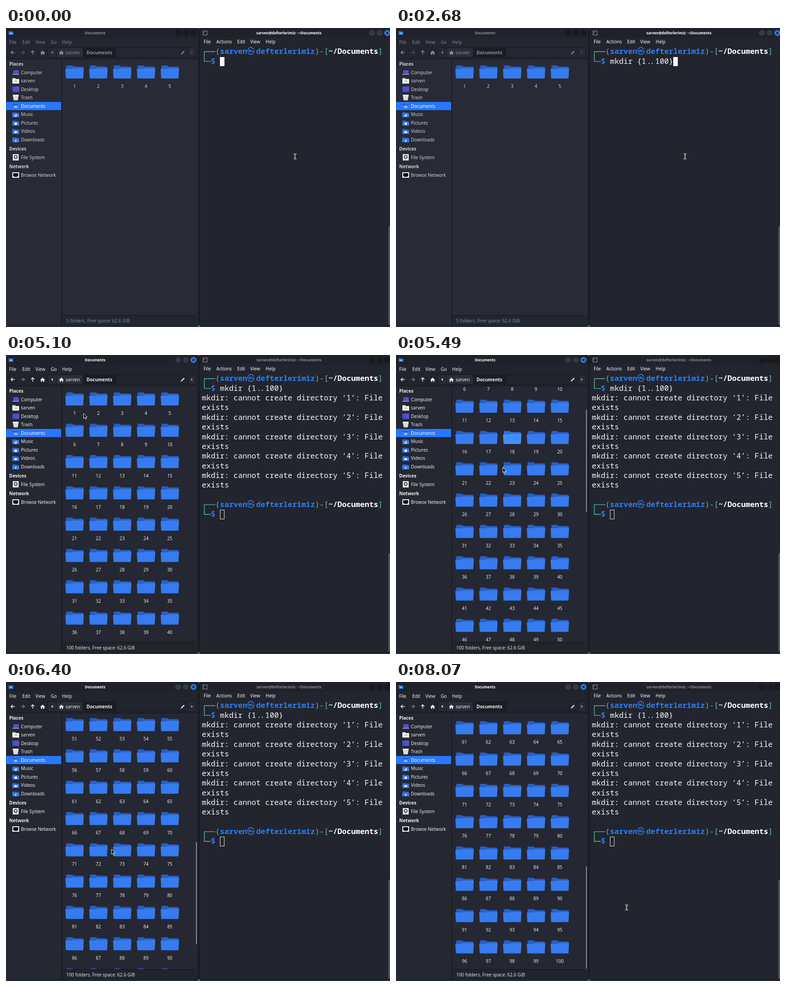
Recreate the animation shown at these times as an HTML page with a canvas. Size 849 by 659 pixels, loop 8.14 s.

```html
<!DOCTYPE html>
<html lang="en">
<head>
<meta charset="utf-8">
<title>mkdir with a brace range</title>
<style>
html, body { margin: 0; width: 100%; height: 100%; overflow: hidden; background: #23252e; }
canvas { display: block; width: 849px; height: 659px; }
</style>
</head>
<body>
<canvas id="stage"></canvas>
<script>
const W = 849, H = 659, LOOP = 8140;
const canvas = document.getElementById('stage');
const ctx = canvas.getContext('2d');
const dpr = window.devicePixelRatio || 1;
canvas.width = W * dpr;
canvas.height = H * dpr;

const UI = '"Noto Sans", "Open Sans", sans-serif';
const MONO = '"Noto Sans Mono", "DejaVu Sans Mono", monospace';
const CJK = '"Noto Sans CJK KR", "Noto Sans CJK JP", "Noto Sans CJK SC", sans-serif';
const USER = 'sarven', HOST = 'defterlerimiz';
const BLUE = '#367bf0', DARK_BLUE = '#2a5fc0', TEAL = '#5ebdab', WHITE = '#ffffff';
const COMMAND = 'mkdir {1..100}';
const KEY_TIMES = [390, 480, 570, 660, 800, 890, 970, 1060, 1660, 1810, 2010, 2460, 2610, 2680];
const ENTER = 3430, CREATED = 3490, MOVE = 4210, STEP = 68.1;
const FOCUS_STEP = 12, MAX_SCROLL = 824, NOTCH = 40.75;

// [step, x, y]
const POINTER = [
  [0, 480, 298], [2, 400, 320], [5, 290, 300], [8, 185, 190], [11, 150, 98],
  [12, 152, 104], [17, 250, 228], [19, 236, 248], [22, 250, 310], [27, 262, 383],
  [30, 240, 378], [34, 226, 359], [36, 205, 432], [39, 178, 500], [43, 260, 560],
  [49, 400, 526], [50, 398, 525], [54, 398, 525], [56, 510, 497]
];
// [step, wheel notches]
const WHEEL = [[15, 0], [19, 3], [27, 10], [34, 20.5]];

function track(keys, n) {
  if (n <= keys[0][0]) return keys[0].slice(1);
  for (let i = 1; i < keys.length; i++) {
    const a = keys[i - 1], b = keys[i];
    if (n <= b[0]) {
      const k = (n - a[0]) / (b[0] - a[0]);
      return a.slice(1).map((v, j) => v + (b[j + 1] - v) * k);
    }
  }
  return keys[keys.length - 1].slice(1);
}

function rect(x, y, w, h, color) {
  ctx.fillStyle = color;
  ctx.fillRect(x, y, w, h);
}

function poly(points, color) {
  ctx.beginPath();
  for (let i = 0; i < points.length; i += 2) ctx.lineTo(points[i], points[i + 1]);
  ctx.closePath();
  ctx.fillStyle = color;
  ctx.fill();
}

function line(points, color, width = 1) {
  ctx.beginPath();
  for (let i = 0; i < points.length; i += 2) ctx.lineTo(points[i], points[i + 1]);
  ctx.strokeStyle = color;
  ctx.lineWidth = width;
  ctx.stroke();
}

function disc(x, y, r, color) {
  ctx.beginPath();
  ctx.arc(x, y, r, 0, Math.PI * 2);
  ctx.fillStyle = color;
  ctx.fill();
}

function label(text, x, y, color, { size = 10, weight = 400, align = 'left' } = {}) {
  ctx.font = `${weight} ${size}px ${UI}`;
  ctx.textAlign = align;
  ctx.fillStyle = color;
  ctx.fillText(text, x, Math.round(y + size * 0.36));
}

function folder(x, y, hot) {
  poly([x + 2, y + 1.5, x + 3, y + 0.5, x + 15, y + 0.5, x + 18.5, y + 3, x + 39, y + 3, x + 40, y + 4, x + 40, y + 12, x + 2, y + 12],
    hot ? '#2f6fdc' : DARK_BLUE);
  poly([x + 0.3, y + 8, x + 14, y + 8, x + 17, y + 6.5, x + 40.5, y + 6.5, x + 41, y + 7.5, x + 39.8, y + 28.3, x + 38.8, y + 29.3, x + 2.4, y + 29.3, x + 1.4, y + 28.3],
    hot ? '#418fff' : BLUE);
}

function miniFolder(x, y, mark) {
  rect(x, y - 5, 7, 4, DARK_BLUE);
  rect(x, y - 4, 14, 9, DARK_BLUE);
  rect(x, y - 2, 15, 8, BLUE);
  if (mark) mark(x + 7.5, y + 2);
}

function titleButtons(xs, focused) {
  xs.forEach((x, i) => {
    const close = i === 2 && focused;
    disc(x, 11, 6.5, close ? '#2f7cf6' : focused ? '#363942' : '#0f1116');
    if (!focused) disc(x, 11, 5.7, '#191b21');
    if (close) {
      line([x - 2.7, 8.3, x + 2.7, 13.7], '#10141c', 1.6);
      line([x + 2.7, 8.3, x - 2.7, 13.7], '#10141c', 1.6);
    }
  });
}

function house(x, y, color) {
  poly([x - 5.5, y + 0.5, x, y - 4.5, x + 5.5, y + 0.5, x + 3.7, y + 0.5, x + 3.7, y + 4.5, x + 1, y + 4.5,
    x + 1, y + 1.5, x - 1, y + 1.5, x - 1, y + 4.5, x - 3.7, y + 4.5, x - 3.7, y + 0.5], color);
}

function arrow(x, y, angle, color) {
  ctx.save();
  ctx.translate(x, y);
  ctx.rotate(angle);
  line([4.5, 0, -4, 0], color, 1.5);
  line([-0.3, -3.8, -4, 0, -0.3, 3.8], color, 1.5);
  ctx.restore();
}

function toolbar(on) {
  const c = on ? '#f2f2f4' : '#8b8e96';
  arrow(15, 54, 0, c);
  arrow(37, 54, Math.PI, on ? '#787c85' : '#50535c');
  arrow(59, 54, Math.PI / 2, c);
  house(81, 54.5, c);
  rect(92, 43, 328, 22, '#15171d');
  rect(93, 44, 18, 20, '#282b35');
  rect(112, 44, 58, 20, '#2b2e38');
  rect(171, 44, 71, 20, '#1b1d24');
  rect(243, 44, 159, 20, on ? '#22242d' : '#252832');
  rect(403, 44, 16, 20, '#282b35');
  poly([103.5, 51, 103.5, 57, 100, 54], c);
  poly([409.5, 51, 409.5, 57, 413, 54], on ? '#a5a8af' : '#555861');
  house(122.5, 54.5, c);
  label(USER, 132, 54, c);
  label('Documents', 178, 54, c, { weight: 700 });
  line([388, 57, 394, 51], c, 2.4);
  poly([386.5, 58.5, 387, 56, 389, 58], c);
}

const white = (w, h) => (x, y) => rect(x - w / 2, y - h / 2, w, h, WHITE);
const PLACES = [
  ['Computer', 98, y => {
    ctx.fillStyle = screenTint(y);
    ctx.fillRect(16, y - 5, 12, 8);
    rect(14, y + 3, 15, 2, '#8f95a5');
  }],
  [USER, 116.5, y => {
    rect(14, y - 6, 7, 3, '#cfd2d6');
    rect(14, y - 4, 15, 10, '#f4f4f5');
    rect(19, y, 6, 1.3, '#7c8088');
  }],
  ['Desktop', 135, y => {
    ctx.fillStyle = screenTint(y);
    ctx.fillRect(14, y - 6, 15, 12);
  }],
  ['Trash', 153.5, y => {
    poly([15, y - 5, 28, y - 5, 26, y + 6, 17, y + 6], '#dadbdc');
    rect(15, y - 6.5, 13, 2.5, '#f7f7f7');
  }],
  ['Documents', 172, y => miniFolder(14, y, (x, v) => {
    disc(x - 1.4, v, 2, '#dce8ff'); disc(x + 1.4, v, 2, '#dce8ff');
    disc(x - 1.4, v, 0.9, BLUE); disc(x + 1.4, v, 0.9, BLUE);
  })],
  ['Music', 190.5, y => miniFolder(14, y, (x, v) => {
    line([x - 1, v + 2, x - 1, v - 2, x + 2, v - 2.5, x + 2, v + 1.5], WHITE);
    disc(x - 1.8, v + 2, 1.2, WHITE); disc(x + 1.3, v + 1.5, 1.2, WHITE);
  })],
  ['Pictures', 209, y => miniFolder(14, y, white(5, 5))],
  ['Videos', 227.5, y => miniFolder(14, y, (x, v) => {
    rect(x - 3, v - 2, 4.5, 4, WHITE);
    poly([x + 1, v, x + 3.5, v - 2, x + 3.5, v + 2], WHITE);
  })],
  ['Downloads', 246, y => miniFolder(14, y, (x, v) => {
    line([x, v - 2.5, x, v + 2.5], WHITE);
    line([x - 2, v + 0.5, x, v + 2.5, x + 2, v + 0.5], WHITE);
  })],
  ['File System', 285, y => {
    rect(15, y - 7, 13, 14, '#f4f4f4');
    disc(21.5, y - 1, 4, '#16181d');
    disc(21.5, y - 1, 2.4, '#f4f4f4');
    rect(17, y + 4.5, 9, 1, '#9a9da3');
  }],
  ['Browse Network', 324, y => {
    rect(14, y - 6, 15, 12, '#f4f4f4');
    rect(16, y - 4, 11, 7, '#08090b');
    rect(18, y + 2, 7, 2, '#08090b');
  }]
];

function screenTint(y) {
  const g = ctx.createLinearGradient(14, y + 5, 29, y - 5);
  g.addColorStop(0, '#2c50d8');
  g.addColorStop(1, '#6a50c4');
  return g;
}

function sidebar(on) {
  const c = on ? '#eeeff1' : '#cdd0d4';
  rect(0, 69, 123, 587, on ? '#252831' : '#282b35');
  rect(0, 163, 122, 18, '#2777ff');
  [['Places', 79], ['Devices', 266], ['Network', 305]].forEach(([s, y]) => label(s, 7, y, c, { weight: 700 }));
  PLACES.forEach(([s, y, icon]) => {
    icon(y);
    label(s, 33, y, y === 172 ? WHITE : c);
  });
  rect(122.5, 69, 1.5, 587, '#17191f');
}

function hovered(x, y, scroll, step) {
  // the highlight lingers while the list scrolls under a still pointer
  if (step === 18 || step === 19) return 18;
  const col = Math.floor((x - 131) / 52.65), row = Math.floor((y + scroll - 82) / 69);
  const inside = x - 131 - col * 52.65 < 41 && y + scroll - 82 - row * 69 < 30;
  return inside && x > 131 && col < 5 && y > 69 && y < 633 ? row * 5 + col + 1 : 0;
}

function fileManager(t, on, scroll, hot) {
  const dim = on ? '#f0f1f3' : '#7f838b';
  const count = t >= CREATED ? 100 : 5;
  rect(0, 0, 426, 656, on ? '#21242c' : '#23262f');
  rect(0, 0, 426, 21, on ? '#1f2229' : '#20232b');
  rect(6, 7, 5, 2, DARK_BLUE);
  rect(6, 8, 10, 7, BLUE);
  rect(9, 11, 4, 1.5, '#dce8ff');
  label('Documents', 197, 11, on ? WHITE : '#8b8e95', { size: 8, weight: 700, align: 'center' });
  titleButtons([380.5, 397.5, 414.5], on);
  [['File', 7], ['Edit', 36], ['View', 65], ['Go', 99], ['Help', 124]].forEach(([s, x]) => label(s, x, 31, dim));
  toolbar(on);
  rect(0, 67.5, 426, 1.5, '#17191f');
  sidebar(on);

  rect(124, 69, 299, 565, on ? '#252832' : '#282b35');
  ctx.save();
  ctx.beginPath();
  ctx.rect(124, 69, 302, 564);
  ctx.clip();
  for (let i = 0; i < count; i++) {
    const x = 131 + (i % 5) * 52.65, y = 82 + Math.floor(i / 5) * 69 - scroll;
    if (y < 0 || y > 640) continue;
    folder(x, y, hot === i + 1);
    label(String(i + 1), x + 20.5, y + 46.5, on ? '#e8e9ec' : '#cdd0d5', { align: 'center' });
  }
  if (scroll > 0) rect(420, 71 + scroll * 0.407, 2, 225, '#8b8e95');
  ctx.restore();
  rect(124, 633, 293, 1, '#111318');
  label(`${count} folders, Free space: 62.6 GiB`, 133, 645, on ? '#e3e4e7' : '#858991');
}

const rowTop = r => 41.9 + 21.35 * r;
const baseline = r => Math.round(rowTop(r) + 15.5);

function mono(text, col, row, color = '#f7f7f8', weight = 400, dx = 0) {
  ctx.font = `${weight} 16.667px ${MONO}`;
  ctx.textAlign = 'left';
  ctx.fillStyle = color;
  ctx.fillText(text, 433 + col * 10 + dx, baseline(row));
}

function prompt(row) {
  const y = rowTop(row) + 10.4, next = y + 21.35;
  line([463, y, 438.5, y, 438.5, next, 453, next], TEAL, 1.4);
  mono('(', 3, row, TEAL);
  mono(USER, 4, row, '#277fff', 700);
  ctx.font = `700 16.5px ${CJK}`;
  ctx.fillText('\u327F', 533, baseline(row));
  mono(HOST, 12, row, '#277fff', 700);
  mono(')-[', 25, row, TEAL);
  mono('~/Documents', 28, row, WHITE, 700);
  mono(']', 39, row, TEAL);
  mono('$', 2, row + 1, '#277fff', 700);
}

function command(count) {
  const paired = count > 9;
  for (let i = 0; i < count; i++) {
    const dx = paired && COMMAND[i] === '.' ? (i === 8 ? 1.6 : -1.6) : 0;
    mono(COMMAND[i], 4 + i, 1, '#f7f7f8', 400, dx);
  }
}

function cursor(col, row, solid) {
  const x = 433 + col * 10, y = Math.round(rowTop(row));
  if (solid) return rect(x, y + 1, 10, 20, WHITE);
  ctx.strokeStyle = '#e8e9eb';
  ctx.lineWidth = 1;
  ctx.strokeRect(x + 0.5, y + 0.5, 9, 20);
}

function terminal(t, on) {
  rect(427, 0, 422, 656, '#23252e');
  rect(427, 0, 422, 21, '#1f2229');
  rect(435, 6, 10, 10, '#a5a8ad');
  rect(436, 7, 8, 8, '#1d2026');
  line([437.5, 9, 439, 10, 437.5, 11], '#d5d7da', 0.9);
  label(`${USER}@${HOST}: ~/Documents`, 625.5, 11, on ? WHITE : '#878a91', { size: 8, weight: 700, align: 'center' });
  titleButtons([809, 826, 843], on);
  [['File', 437], ['Actions', 465], ['Edit', 511], ['View', 540], ['Help', 574]]
    .forEach(([s, x]) => label(s, x, 30, '#f7f7f8', { weight: 500 }));

  const typed = KEY_TIMES.filter(k => t >= k).length;
  prompt(0);
  command(typed);
  if (t < ENTER) {
    cursor(4 + typed, 1, true);
  } else {
    for (let i = 1; i <= 5; i++) {
      mono(`mkdir: cannot create directory \u2018${i}\u2019: File`, 0, i * 2);
      mono('exists', 0, i * 2 + 1);
    }
    prompt(13);
    cursor(4, 14, on);
  }
  rect(846, 437, 2, 217, '#6e7076');
}

function pointer(x, y) {
  if (x > 426) {
    const shape = [[x - 3, y - 6, x - 0.5, y - 5, x + 0.5, y - 5, x + 3, y - 6],
      [x, y - 5, x, y + 5], [x - 3, y + 6, x - 0.5, y + 5, x + 0.5, y + 5, x + 3, y + 6]];
    shape.forEach(s => line(s, '#e9eaec', 2.4));
    shape.forEach(s => line(s, '#15171b', 0.8));
    return;
  }
  const tip = [0, 0, 0, 11, 2.6, 8.6, 4.5, 13, 6.4, 12.2, 4.5, 8, 8, 8].map((v, i) => v + (i % 2 ? y : x));
  poly(tip, '#0b0c0e');
  line([...tip, tip[0], tip[1]], '#f2f2f2', 1);
}

function draw(t) {
  ctx.setTransform(dpr, 0, 0, dpr, 0, 0);
  const step = Math.floor((t - MOVE) / STEP + 0.2);
  const moved = t >= MOVE;
  const [x, y] = moved ? track(POINTER, step) : [639, 283];
  const notches = Math.floor(track(WHEEL, step)[0] + 0.001);
  const scroll = Math.min(MAX_SCROLL, Math.round(notches * NOTCH) + (step >= 34 ? NOTCH : 0));
  const fmOn = step >= FOCUS_STEP;
  rect(0, 0, W, H, '#1b1e29');
  fileManager(t, fmOn, scroll, moved ? hovered(x, y, scroll, step) : 0);
  terminal(t, !fmOn);
  rect(425.5, 0, 2, 656, '#14161c');
  rect(0, 656, W, 1, '#15171d');
  rect(0, 657, W, 2, '#2a3047');
  rect(425, 0, 3, 2, '#3c58b0');
  rect(424, 655, 5, 4, '#3c58b0');
  pointer(x, y);
}

const start = performance.now();
function tick() {
  draw((performance.now() - start) % LOOP);
  requestAnimationFrame(tick);
}
tick();
</script>
</body>
</html>
```
